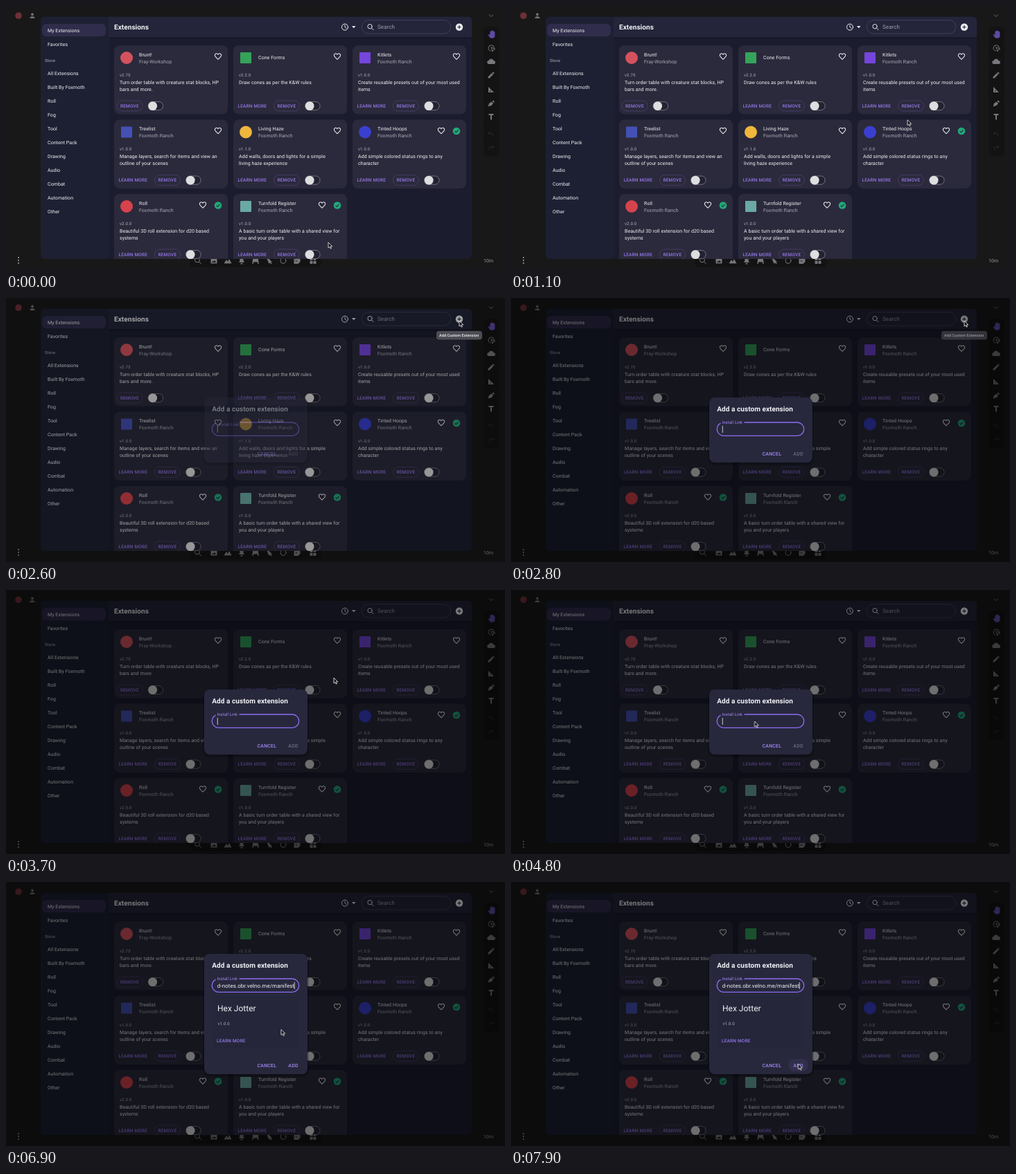
An HTML page that plays this animation: 720 by 382 pixels, repeating every 8 s.

```html
<!DOCTYPE html>
<html lang="en">
<head>
<meta charset="utf-8">
<title>Extensions</title>
<style>
html, body { margin: 0; width: 100%; height: 100%; overflow: hidden; background: #181819; }
svg { display: block; width: 100vw; height: 100vh; }
text { font-family: Roboto, Arial, sans-serif; fill: #f2f2f6; text-rendering: geometricPrecision; white-space: pre; }
.body { font-size: 7px; letter-spacing: .07px; }
.sub { fill: #a9a9b5; }
.cap { font-size: 6px; letter-spacing: .2px; fill: #b4b4bf; }
.head { font-size: 10px; font-weight: 700; letter-spacing: .06px; }
.btn { font-size: 6.5px; font-weight: 500; letter-spacing: .186px; fill: #9678ea; }
.act { font-size: 7px; font-weight: 500; letter-spacing: .2px; fill: #a488f4; }
.off { fill: #6c6d7d; }
.input { font-size: 8px; letter-spacing: .07px; }
.label { font-size: 6px; letter-spacing: .06px; fill: #a488f4; }
.tip { font-size: 5.5px; font-weight: 500; letter-spacing: .07px; }
.line { fill: none; stroke: currentColor; stroke-width: 2; stroke-linecap: round; stroke-linejoin: round; }
.solid { fill: currentColor; }

#cursor { animation: move 8s infinite; }
@keyframes move {
  0% { transform: translate(465px, 342px); }
  7.5% { transform: translate(465px, 342px); animation-timing-function: steps(4); }
  12.5% { transform: translate(540px, 214px); animation-timing-function: steps(3); }
  16.25% { transform: translate(636px, 66px); animation-timing-function: steps(2); }
  18.75% { transform: translate(654px, 33px); }
  41.25% { transform: translate(654px, 33px); animation-timing-function: steps(2); }
  43.75% { transform: translate(580px, 68px); animation-timing-function: steps(2); }
  46.25% { transform: translate(473px, 127px); animation-timing-function: steps(2); }
  48.75% { transform: translate(387px, 172px); animation-timing-function: steps(3); }
  52.5% { transform: translate(352px, 189px); animation-timing-function: steps(3); }
  56.25% { transform: translate(351.5px, 190px); }
  70% { transform: translate(351.5px, 190px); animation-timing-function: steps(6); }
  77.5% { transform: translate(385.5px, 196px); animation-timing-function: steps(3); }
  81.25%, 82.5% { transform: translate(389px, 197px); animation-timing-function: steps(9); }
  93.75% { transform: translate(413px, 246px); animation-timing-function: steps(4); }
  98.75%, 100% { transform: translate(414.5px, 263px); }
}
#dim { animation: dim 8s step-end infinite; }
@keyframes dim {
  0% { opacity: 0; }
  32.5% { opacity: .32; }
  33.75% { opacity: .46; }
  35%, 100% { opacity: .5; }
}
#dialog { animation: appear 8s step-end infinite; }
@keyframes appear {
  0% { opacity: 0; }
  32.5% { opacity: .45; }
  33.75% { opacity: .9; }
  35%, 100% { opacity: 1; }
}
#tip { animation: tip 8s step-end infinite; }
@keyframes tip {
  0% { opacity: 0; }
  21.25% { opacity: .35; }
  22.5% { opacity: .8; }
  23.75% { opacity: 1; }
  35% { opacity: .6; }
  36.25% { opacity: .2; }
  37.5%, 100% { opacity: 0; }
}
.label { animation: label 8s step-end infinite; }
@keyframes label {
  0% { transform: translate(2px, 3px); }
  33.75% { transform: translate(0, 1px); }
  35%, 100% { transform: none; }
}
.up { animation: up 8s step-end infinite; }
.down { animation: down 8s step-end infinite; }
@keyframes up { 78.75%, 100% { transform: translateY(-40px); } }
@keyframes down { 78.75%, 100% { transform: translateY(40px); } }
#spin { transform-origin: 414px 225px; animation: spin 1s linear infinite; }
@keyframes spin { to { transform: rotate(360deg); } }
</style>
</head>
<body>
<svg id="stage" viewBox="0 0 720 382" preserveAspectRatio="none"></svg>
<script>
const LOOP = 8000;
let rules = '';

const text = (x, y, str, cls = 'body') => `<text x="${x}" y="${y}" class="${cls}">${str}</text>`;
const box = (x, y, w, h, r, fill, extra = '') =>
  `<rect x="${x}" y="${y}" width="${w}" height="${h}" rx="${r}" fill="${fill}" ${extra}/>`;
const disc = (x, y, r, fill, extra = '') => `<circle cx="${x}" cy="${y}" r="${r}" fill="${fill}" ${extra}/>`;

// Icons live in a 24 unit square centred on x, y.
const icon = (x, y, d, color, cls = 'line', size = 12) =>
  `<g transform="translate(${x} ${y}) scale(${size / 24}) translate(-12 -12)" color="${color}"><path class="${cls}" d="${d}"/></g>`;

// Content that is visible only between two times of the loop.
let shown = 0;
function during(from, to, inner) {
  const id = 'show' + shown++;
  const pct = t => t / LOOP * 100 + '%';
  rules += `.${id}{animation:${id} 8s step-end infinite}@keyframes ${id}{` +
    `0%{opacity:${from ? 0 : 1}}${pct(from)}{opacity:1}` +
    (to < LOOP ? `${pct(to)}{opacity:0}100%{opacity:0}}` : '100%{opacity:1}}');
  return `<g class="${id}">${inner}</g>`;
}

const paths = {
  heart: 'M12 20C6.500 15 3 12 3 8.500C3 4 9 2 12 6.500C15 2 21 4 21 8.500C21 12 17.500 15 12 20Z',
  search: 'M15.500 15.500L21 21M17 10a7 7 0 1 1-14 0a7 7 0 1 1 14 0Z',
  clock: 'M21 12a9 9 0 1 1-18 0a9 9 0 1 1 18 0ZM12 7v5l4 3',
  person: 'M12 12a4 4 0 1 0 0-8a4 4 0 1 0 0 8ZM4 20c0-8 16-8 16 0Z',
  chevron: 'M6 9l6 6l6-6',
  hand: 'M7 13l-4-1l6 9c3 2 12 2 13-3V6c0-2-3-2-3 0V4c0-2-3.500-2-3.500 0V3c0-2-3.500-2-3.500 0V5c0-2-3-2-3 0v8Z',
  point: 'M10 20a8.500 8.500 0 1 1 11-9M12 10l4 12l2-5l5-2Z',
  cloud: 'M6 20a5 5 0 0 1-1-10a7.500 7.500 0 0 1 14 0a5 5 0 0 1 0 10Z',
  pencil: 'M3 21v-4L14 6l4 4L7 21ZM15 5l2-2c1-1 5 3 4 4l-2 2Z',
  ruler: 'M4 4v16h16ZM8 13l4 4H8Z',
  brush: 'M3 21l3-9l7-5l5 5l-5 6ZM15 6l3-3l4 4l-3 3Z',
  letter: 'M5 4h14v4h-5v13h-4V8H5Z',
  undo: 'M8 6L4 10l4 4M4 10h10c6 0 6 8 2 8',
  redo: 'M16 6l4 4l-4 4M20 10H10c-6 0-6 8-2 8',
  image: 'M3 4h18v16H3ZM6 17h12l-4-6l-3 4l-2-2Z',
  hills: 'M1 20l7-11l4 6l4-8l7 13Z',
  pawn: 'M12 3c5 0 6 6 5 9l3 5H4l3-5C6 9 7 3 12 3ZM9 19h6v3H9Z',
  chair: 'M4 5h16v8h1v8h-3v-5H6v5H3v-8h1Z',
  pin: 'M4 4l7 3l9 9l-4 1l4 4l-2 1l-5-4l-2 3Z',
  ring: 'M20 12a8 8 0 1 1-16 0a8 8 0 1 1 16 0Z',
  note: 'M3 3h18v12l-6 6H3ZM7 12v2h6v-2Z',
  blocks: 'M3 3h8v8H3ZM3 13h8v8H3ZM13 13h8v8h-8ZM17 2l5 5l-5 5l-5-5Z'
};

const purple = '#9678ea', white = '#f2f2f6', gray = '#77777c';

function surroundings() {
  const tools = [['point', 61, 'line'], ['cloud', 80], ['pencil', 100], ['ruler', 121],
    ['brush', 141], ['letter', 160]];
  const tray = [['search', 277, 'line'], ['image', 300], ['hills', 320], ['pawn', 340], ['chair', 360],
    ['pin', 380], ['ring', 400, 'line'], ['note', 420], ['blocks', 443]];
  return box(0, 0, 720, 382, 0, '#181819') +
    box(689, 30, 23, 187, 6, '#131314') +
    box(265, 357, 190, 21, 6, '#131314') +
    disc(18, 14, 4.8, '#6f3038') +
    icon(38, 14, paths.person, gray, 'solid', 11) +
    icon(700, 14, paths.chevron, gray, 'line', 11) +
    icon(700, 41, paths.hand, '#5f4aa3', 'solid', 13) +
    tools.map(([n, y, c = 'solid']) => icon(700, y, paths[n], gray, c, 12)).join('') +
    icon(700, 185, paths.undo, '#2f2f33', 'line', 11) +
    icon(700, 205, paths.redo, '#2f2f33', 'line', 11) +
    tray.map(([n, x, c = 'solid']) => icon(x, 368.5, paths[n], gray, c, 12)).join('') +
    [364, 368, 372].map(y => disc(18, y, 1, '#a0a0a4')).join('') +
    `<g opacity=".6">${text(689, 371, '10m')}</g>`;
}

function sidebar() {
  const items = ['All Extensions', 'Built By Foxmoth', 'Roll', 'Fog', 'Tool', 'Content Pack', 'Drawing',
    'Audio', 'Combat', 'Automation', 'Other'];
  return box(50, 15.5, 99, 350.5, 6, '#1d2032') +
    box(52, 26, 92, 18, 6, '#302d4c') +
    text(60, 37.8, 'My Extensions') + text(60, 57.8, 'Favorites') +
    text(56, 80.5, 'Store', 'cap') +
    items.map((s, i) => text(60, 100 + i * 20, s)).join('');
}

function header() {
  return box(148, 15.5, 524, 29.5, 0, '#24253a') +
    box(148, 45, 524, 3, 0, '#000', 'opacity=".12"') +
    text(156, 34, 'Extensions', 'head') +
    icon(489, 30.5, paths.clock, white) +
    `<path d="M499 29h5.500l-2.750 3Z" fill="${white}"/>` +
    box(513.3, 20.5, 128.5, 19.5, 9.7, 'none', 'stroke="#4b4c5d" stroke-width=".7"') +
    icon(526, 30.5, paths.search, white, 'line', 11) +
    `<g opacity=".58">${text(536, 33.2, 'Search', 'input')}</g>` +
    disc(654, 30.5, 5.2, white) +
    '<path d="M654 27.700v5.600M651.200 30.500h5.600" stroke="#24253a" stroke-width="1.200"/>';
}

const pill = (x, y, w) => box(x, y, w, 15, 7.5, 'none', 'stroke="#51467f" stroke-width=".6"');

function card(c, i) {
  const x = 156 + i % 3 * 172, y = 57 + Math.floor(i / 3) * 107.5;
  const shift = c.short ? -54.5 : 0;
  const mark = c.round ? disc(x + 18, y + 18, 9, c.color) : box(x + 10, y + 10, 16, 16, 1, c.color);
  const badge = disc(x + 150, y + 16.5, 5.3, '#22a87a') +
    `<path d="M${x + 147.6} ${y + 16.6}l1.800 1.800l3.200-3.500" fill="none" stroke="#2b2a3d" stroke-width="1.100"/>`;
  return box(x, y, 164, 99.5, 8, '#2b2a3c') + mark +
    text(x + 36, y + (c.by ? 15.6 : 20.4), c.name) +
    (c.by ? text(x + 36, y + 25.6, c.by, 'body sub') : '') +
    icon(x + (c.ok ? 128 : 150), y + 16, paths.heart, white, 'line', 12.5) + (c.ok ? badge : '') +
    text(x + 8, y + 44.8, 'v' + c.ver, 'cap') +
    c.about.map((s, n) => text(x + 8, y + 55.6 + n * 10, s)).join('') +
    (c.short ? '' : text(x + 6.5, y + 89.9, 'LEARN MORE', 'btn')) +
    pill(x + 58.5 + shift, y + 80, 37) +
    text(x + 63.5 + shift, y + 89.9, 'REMOVE', 'btn') +
    box(x + 103.6 + shift, y + 81.5, 21.5, 12.2, 6.1, '#232232', 'stroke="#85848d" stroke-width=".8"') +
    disc(x + 110.2 + shift, y + 87.6, 6.4, '#dedee0');
}

const by = 'Foxmoth Ranch';
const cards = [
  { name: 'Brunt!', by: 'Fray-Workshop', ver: '2.75', color: '#d4525e', round: 1, short: 1,
    about: ['Turn order table with creature stat blocks, HP', 'bars and more.'] },
  { name: 'Cone Forms', ver: '2.2.0', color: '#35a35a', about: ['Draw cones as per the K&amp;W rules'] },
  { name: 'Kitlets', by, ver: '1.0.0', color: '#7446dc',
    about: ['Create reusable presets out of your most used', 'items'] },
  { name: 'Treelist', by, ver: '1.0.0', color: '#4450b4',
    about: ['Manage layers, search for items and view an', 'outline of your scenes'] },
  { name: 'Living Haze', by, ver: '1.1.0', color: '#efb73c', round: 1,
    about: ['Add walls, doors and lights for a simple', 'living haze experience'] },
  { name: 'Tinted Hoops', by, ver: '1.0.0', color: '#3a3fd0', round: 1, ok: 1,
    about: ['Add simple colored status rings to any', 'character'] },
  { name: 'Roll', by, ver: '2.0.0', color: '#d5434c', round: 1, ok: 1,
    about: ['Beautiful 3D roll extension for d20 based', 'systems'] },
  { name: 'Turnfold Register', by, ver: '1.0.0', color: '#6aa9a4', ok: 1,
    about: ['A basic turn order table with a shared view for', 'you and your players'] }
];

const caret = x => box(x, 185, .8, 10, 0, white);

function dialog() {
  const sheet = (y, h) => box(284, y + 1, 153, h + 3, 10, '#000', 'opacity=".22"') + box(286, y, 149, h, 8, '#27283c');
  const field = `<path d="M336.500 180H413a9.700 9.700 0 0 1 0 19.400H307a9.700 9.700 0 0 1-4.500-18.300" fill="none" stroke="#8f6cf0" stroke-width="1.300"/>`;
  const spinner = '<path id="spin" d="M417.500 227A4 4 0 0 1 411.500 228.200" fill="none" stroke="#6a638c" stroke-width="1"/>';
  return during(0, 6300, sheet(144, 94)) +
    during(6300, LOOP, sheet(104, 174) + box(298, 166, 125, 75, 7, '#25263a') +
      `<text x="305" y="186.800" font-size="12">Hex Jotter</text>` +
      text(305.5, 207, 'v1.0.0', 'cap') + text(304, 232.3, 'LEARN MORE', 'btn')) +
    '<g class="up">' +
      text(297.3, 163.6, 'Add a custom extension', 'head') + field +
      text(304.5, 182.2, 'Install Link', 'label') +
      during(0, 5200, caret(304.8)) +
      during(5200, LOOP, text(304.8, 192.8, 'd-notes.obr.velno.me/manifest', 'input')) +
      during(6700, LOOP, caret(415.8)) +
    '</g><g class="down">' +
      text(362.5, 227.6, 'CANCEL', 'act') +
      during(0, 5700, text(407.3, 227.6, 'ADD', 'act off')) +
      during(5700, 6300, spinner) +
      during(7600, LOOP, box(400.5, 216, 28, 18, 8, purple, 'opacity=".1"')) +
      during(6300, LOOP, text(407.3, 227.6, 'ADD', 'act')) +
    '</g>';
}

const tooltip = box(621, 47.8, 66, 12.4, 4, '#4c4d54') + text(625, 56, 'Add Custom Extension', 'tip');
const arrow = '<path d="M0 0V8L1.900 6.300L3.200 9.100L4.500 8.500L3.300 5.800H5.800Z" fill="#111" stroke="#f4f4f4" stroke-width=".8"/>';

const view = surroundings() +
  '<clipPath id="panel"><rect x="50" y="15.500" width="622" height="350.500" rx="6"/></clipPath>' +
  `<g clip-path="url(#panel)">${box(50, 15.5, 622, 351, 0, '#1b1d2f')}${sidebar()}${header()}${cards.map(card).join('')}</g>` +
  `<g id="dim">${box(0, 0, 720, 382, 0, '#000')}</g>` +
  `<g id="dialog">${dialog()}</g>` +
  `<g id="tip">${tooltip}</g><g id="cursor">${arrow}</g>`;

const style = document.createElement('style');
style.textContent = rules;
document.head.append(style);
document.getElementById('stage').innerHTML = view;
</script>
</body>
</html>
```
